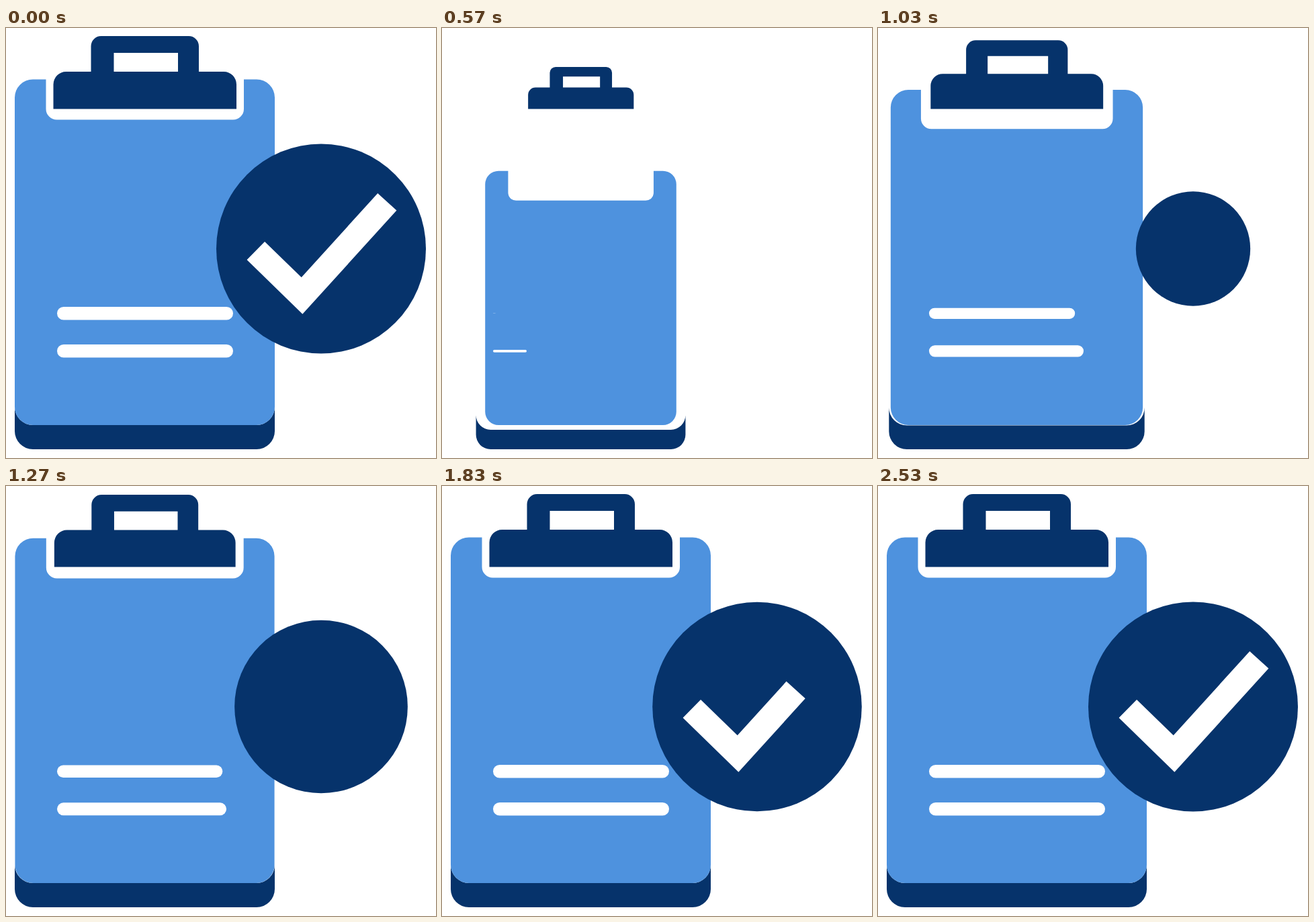
Recreate the animation shown at these times as an HTML page. Size 640x640 px, loop 5610 ms.

```html
<!DOCTYPE html>
<html lang="en">
<head>
<meta charset="utf-8">
<title>Clipboard check</title>
<style>
  html, body { margin: 0; width: 100%; height: 100%; overflow: hidden; background: #fff; }
  svg { display: block; width: 100%; height: 100%; }
  .dark { fill: #06336b; }
  .light { fill: #4e92de; }
  .white { fill: #fff; }
</style>
</head>
<body>
<svg viewBox="0 0 640 640">
  <path id="base" class="dark" d="M13 564V600a27 27 0 0 0 27 27H373a27 27 0 0 0 27-27V564a27 27 0 0 1-27 27H40a27 27 0 0 1-27-27Z"/>
  <path id="board" class="light" d="M13 103.5a27 27 0 0 1 27-27H59.5V120.5a16 16 0 0 0 16 16H338a16 16 0 0 0 16-16V76.5H373a27 27 0 0 1 27 27V564a27 27 0 0 1-27 27H40a27 27 0 0 1-27-27Z"/>
  <path id="clip" class="dark" fill-rule="evenodd" d="M70.5 120.5V84a19 19 0 0 1 19-19H126.5V27a15 15 0 0 1 15-15H272a15 15 0 0 1 15 15V65H324a19 19 0 0 1 19 19V120.5ZM160.5 37V65H256V37Z"/>
  <rect id="upper" class="white" x="76" y="415" width="262" height="19.6" rx="9.8"/>
  <rect id="lower" class="white" x="76" y="471" width="262" height="19.6" rx="9.8"/>
  <circle id="disc" class="dark" cx="469" cy="328.5" r="156"/>
  <path id="tick" fill="none" stroke="#fff" stroke-width="38" stroke-miterlimit="10"/>
</svg>
<script>
const LOOP = 5610, INTRO = 170, FPS = 30;
const $ = id => document.getElementById(id);

// Scaled parts: id, anchor x, anchor y, start and length in 1/30 s
const parts = [
  ['base', 206.5, 627, 2.3, 36.4],
  ['board', 206.5, 591, 4.9, 36],
  ['clip', 206.75, 120.5, 8.8, 35],
  ['lower', 76, 480.8, 13.1, 35.8],
  ['upper', 76, 424.8, 15.7, 35.5],
  ['disc', 469, 328.5, 23.6, 33.7]
];
const tick = { start: 42.4, length: 32.8, points: [[371.8, 331.5], [440.5, 398.4], [567.3, 258.8]] };

// cubic-bezier(.2, 0, 0, 1)
function ease(x) {
  if (x <= 0) return 0;
  if (x >= 1) return 1;
  let lo = 0, hi = 1;
  for (let i = 0; i < 24; i++) {
    const s = (lo + hi) / 2;
    if (0.6 * s * (1 - s) ** 2 + s ** 3 < x) lo = s; else hi = s;
  }
  return lo * lo * (3 - 2 * lo);
}

function tickPath(amount) {
  const [a, b, c] = tick.points;
  const dist = (p, q) => Math.hypot(q[0] - p[0], q[1] - p[1]);
  const toward = (p, q, f) => [p[0] + (q[0] - p[0]) * f, p[1] + (q[1] - p[1]) * f];
  const first = dist(a, b), second = dist(b, c);
  const drawn = amount * (first + second);
  if (drawn <= 0) return '';
  if (drawn <= first) return `M${a}L${toward(a, b, drawn / first)}`;
  return `M${a}L${b}L${toward(b, c, (drawn - first) / second)}`;
}

function draw(ms) {
  const t = ms % LOOP;
  // The finished picture shows briefly before the build-up begins
  const step = t < INTRO ? Infinity : Math.floor((t + 4) * FPS / 1000);
  for (const [id, x, y, start, length] of parts) {
    const s = ease((step - start) / length);
    $(id).setAttribute('transform', `translate(${x} ${y}) scale(${s}) translate(${-x} ${-y})`);
  }
  $('tick').setAttribute('d', tickPath(ease((step - tick.start) / tick.length)));
}

const begin = performance.now();
function loop() {
  draw(performance.now() - begin);
  requestAnimationFrame(loop);
}
loop();
</script>
</body>
</html>
```
